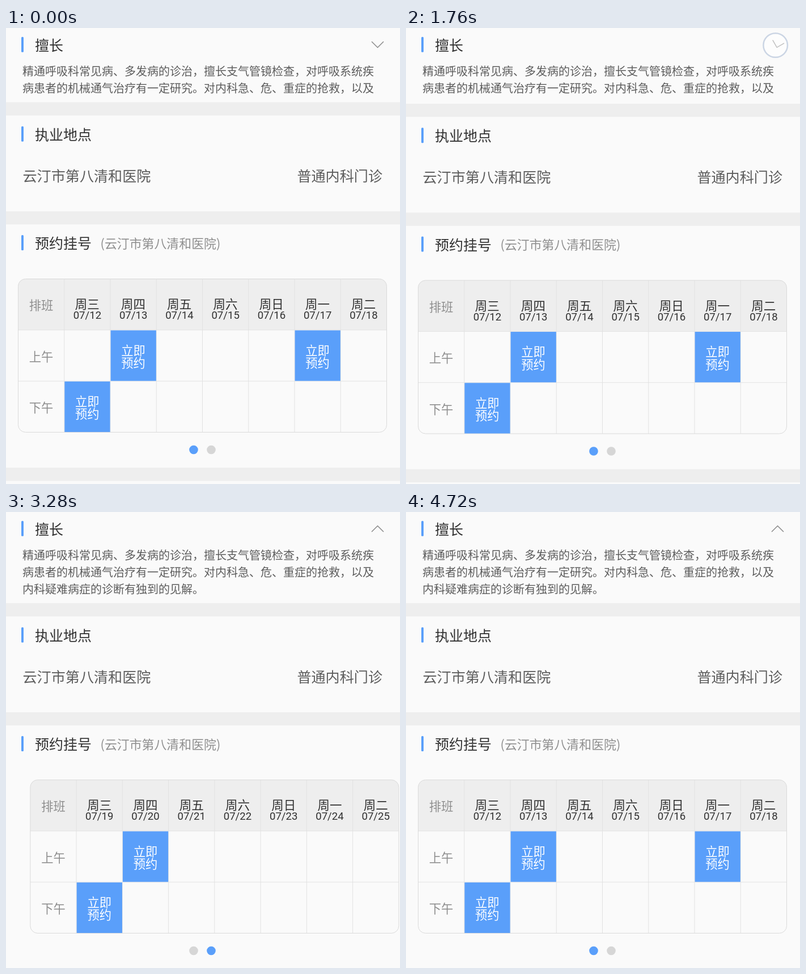
An HTML page that plays this animation: 695x806 px, repeating every 5280 ms.

```html
<!DOCTYPE html>
<html lang="zh-CN">
<head>
<meta charset="utf-8">
<style>
html, body { margin: 0; width: 100%; height: 100%; overflow: hidden; background: #fafafa; }
svg { display: block; font-family: "Noto Sans CJK SC", "Noto Sans CJK", sans-serif; }
.date { font-family: Roboto, sans-serif; }
</style>
</head>
<body>
<svg id="stage" width="695" height="806" viewBox="0 0 695 806"></svg>
<script>
const LOOP = 5280;
const BLUE = '#5a9ffa', BAND = '#eeeeee', LINE = '#e2e2e2';
const DARK = '#303030', MID = '#5c5c5c', PALE = '#8e8e8e';
const COL = 81.25, ROW = 90.33, PAGE = 697, EXTRA = 30;
const HOSPITAL = '云汀市第八清和医院';

// CJK text placed by the vertical centre of its glyphs
const text = (x, cy, size, fill, str, anchor = 'start') =>
  `<text x="${x}" y="${cy + size * 0.38}" font-size="${size}" fill="${fill}" text-anchor="${anchor}">${str}</text>`;
const centred = (x, cy, size, fill, str) => text(x, cy, size, fill, str, 'middle');
const rect = (x, y, w, h, fill, rx = 0) =>
  `<rect x="${x}" y="${y}" width="${w}" height="${h}" rx="${rx}" fill="${fill}"/>`;
const heading = (cy, str) => rect(27, cy - 14.5, 4, 27, BLUE, 1.5) + text(51, cy, 25, DARK, str);
const band = y => rect(0, y, 695, 23.3, BAND);

function schedule(x, firstDay, booked) {
  const w = COL * 8, h = ROW * 3, r = 13;
  let out = `<path d="M0 ${ROW}V${r}a${r} ${r} 0 0 1 ${r} ${-r}H${w - r}a${r} ${r} 0 0 1 ${r} ${r}V${ROW}z" fill="${BAND}"/>`;
  let lines = '';
  for (let c = 1; c < 8; c++) lines += `M${c * COL} 0V${h}`;
  for (let row = 1; row < 3; row++) lines += `M0 ${row * ROW}H${w}`;
  out += `<path d="${lines}" stroke="${LINE}"/>`;
  out += `<rect width="${w}" height="${h}" rx="${r}" fill="none" stroke="#dadada"/>`;
  ['排班', '上午', '下午'].forEach((label, row) =>
    out += centred(COL / 2, row * ROW + 46.8, 21.3, PALE, label));
  [...'三四五六日一二'].forEach((day, i) => {
    const cx = (i + 1.5) * COL;
    out += centred(cx, 44.5, 21.5, DARK, '周' + day);
    out += `<text class="date" x="${cx}" y="70.7" font-size="18.6" fill="${DARK}" text-anchor="middle">07/${firstDay + i}</text>`;
  });
  for (const [col, row] of booked) {
    const cx = (col + 0.5) * COL, top = row * ROW;
    out += rect(col * COL + 0.6, top + 0.6, COL - 1, ROW - 1, BLUE);
    out += centred(cx, top + 35.8, 21.3, '#fff', '立即') + centred(cx, top + 58.2, 21.3, '#fff', '预约');
  }
  return `<g transform="translate(${x} 443.5)">${out}</g>`;
}

const description = [
  '精通呼吸科常见病、多发病的诊治，擅长支气管镜检查，对呼吸系统疾',
  '病患者的机械通气治疗有一定研究。对内科急、危、重症的抢救，以及',
  '内科疑难病症的诊断有独到的见解。'
].map((str, i) => text(29, 76.5 + i * 29.8, 20, MID, str)).join('');

const $ = id => document.getElementById(id);
$('stage').innerHTML = `
  <clipPath id="fold"><rect id="foldRect" width="695" height="120"/></clipPath>
  ${heading(30.3, '擅长')}
  <g clip-path="url(#fold)">${description}</g>
  <path id="arrow" d="M645 24l10.5 10.5l10.5 -10.5" fill="none" stroke="#8a8a8a" stroke-width="1.5"/>
  <circle id="touch" cx="651.7" cy="30.5" r="21.3" fill="#fff" fill-opacity=".45" stroke="#cbd5e4" stroke-width="2.5"/>
  <g id="lower">
    ${band(131.2)}
    ${heading(188.2, '执业地点')}
    ${text(29.5, 261, 25.1, MID, HOSPITAL)}
    ${text(664, 261, 25.1, MID, '普通内科门诊', 'end')}
    ${band(323.9)}
    ${heading(380.5, '预约挂号')}
    ${text(166.5, 380.5, 21.9, PALE, `(${HOSPITAL})`)}
    <g id="pages">
      ${schedule(21.5, 12, [[2, 1], [6, 1], [1, 2]])}
      ${schedule(21.5 + PAGE, 19, [[2, 1], [1, 2]])}
    </g>
    <circle id="dot0" cx="331" cy="745.5" r="7.8"/>
    <circle id="dot1" cx="362" cy="745.5" r="7.8"/>
    ${band(777.2)}
  </g>`;

const progress = (t, start, length) => Math.min(1, Math.max(0, (t - start) / length));
const smooth = x => (1 - Math.cos(Math.PI * x)) / 2;
const fling = x => 1 - (1 - x * x) ** 7;
const between = (t, a, b) => t >= a && t < b;

function draw(t) {
  const toggle = start => smooth(progress(t, start, 420));
  const open = toggle(473) - toggle(1078) + toggle(1682);
  const page = fling(progress(t, 2795, 776)) - fling(progress(t, 3489, 751));

  $('foldRect').setAttribute('height', 120 + EXTRA * open);
  $('arrow').setAttribute('transform', `rotate(${180 * open} 655.5 29.5)`);
  $('lower').setAttribute('transform', `translate(0 ${EXTRA * open})`);
  $('pages').setAttribute('transform', `translate(${-PAGE * page} 0)`);
  const touching = between(t, 1030, 1150) || between(t, 1630, 1800);
  $('touch').setAttribute('visibility', touching ? 'visible' : 'hidden');
  const current = page > 0.5 ? 1 : 0;
  [0, 1].forEach(i => $('dot' + i).setAttribute('fill', i === current ? BLUE : '#d6d6d6'));
}

const begin = performance.now();
function frame() {
  draw((performance.now() - begin) % LOOP);
  requestAnimationFrame(frame);
}
frame();
</script>
</body>
</html>
```
